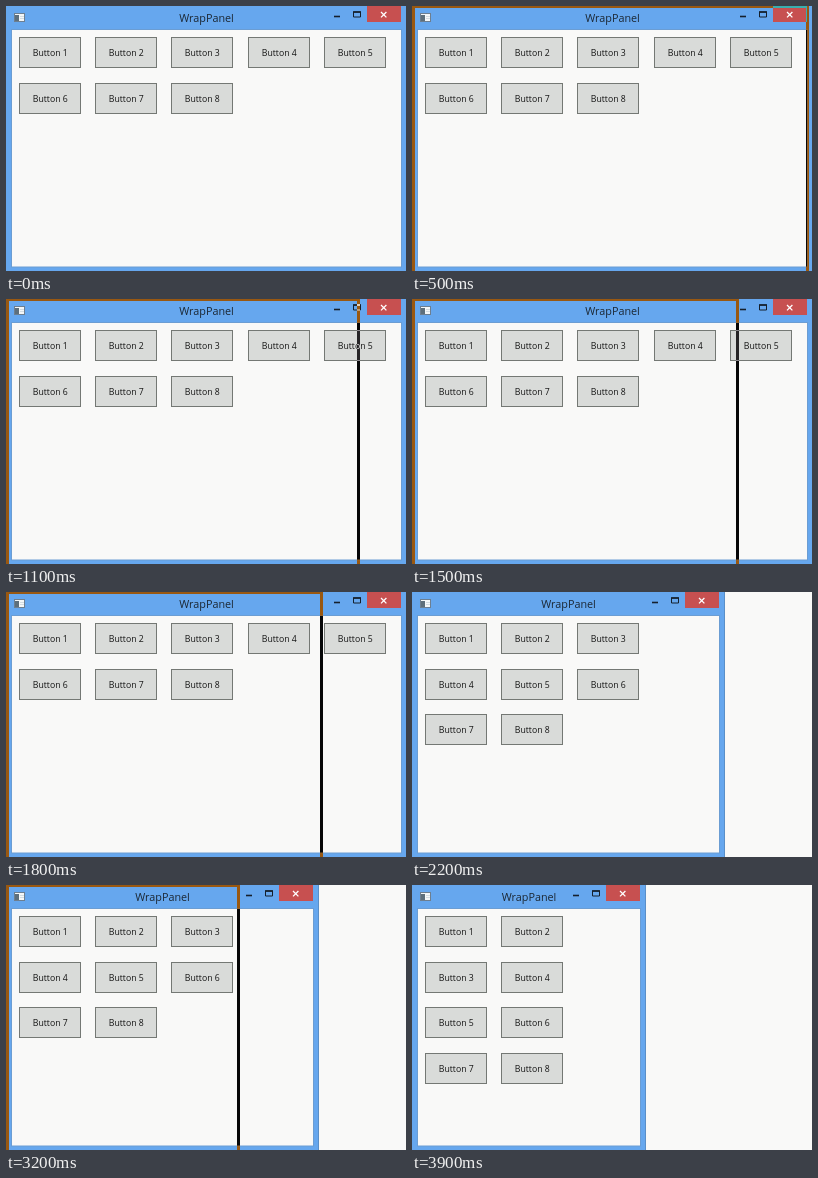
Write an HTML page that moves like this. It is 400 px wide and 265 px high and loops after 4.2 s.

```html
<!DOCTYPE html>
<html lang="en">
<head>
<meta charset="utf-8">
<title>WrapPanel</title>
<style>
  html, body { margin: 0; width: 100%; height: 100%; overflow: hidden; background: #f9f9f8; }
  svg { display: block; width: 100%; height: 100%; font-family: "Open Sans", "Noto Sans", sans-serif; }
  text { text-anchor: middle; fill: #141414; }
  #title { font-size: 10.8px; fill: #1b2733; }
  #buttons text { font-size: 8.7px; }
  #buttons rect { fill: #d9dbd9; stroke: #747874; }
  #drag { fill: none; stroke: #fff; stroke-width: 3; mix-blend-mode: difference; }
</style>
</head>
<body>
<svg viewBox="0 0 400 265">
  <rect width="400" height="265" fill="#f9f9f8"/>
  <rect id="frame" x="-.5" y="-.5" height="270" fill="#66a7ee" stroke="#5a8fc8"/>
  <rect id="client" x="5.5" y="23.5" height="237.5" fill="#f9f9f8" stroke="#6b9dd3"/>
  <g id="icon">
    <rect x="8.5" y="7.5" width="10" height="8" fill="#f4f7f8" stroke="#6d7f91"/>
    <rect x="9" y="9" width="4" height="6" fill="#5d6f7c"/>
    <path d="M14 10.5h4M14 12.5h4" stroke="#d3dce2"/>
  </g>
  <text id="title" y="15.7">WrapPanel</text>
  <g id="controls">
    <rect x="-34" width="34" height="16" fill="#c75050"/>
    <path d="M-20 6l5.4 5.4M-14.6 6l-5.4 5.4" stroke="#fff" stroke-width="1.3"/>
    <path d="M-67 10.5h6" stroke="#15202c" stroke-width="1.6"/>
    <path d="M-47.5 6v5h7v-5z" fill="none" stroke="#15202c"/>
    <path d="M-48 6h8" stroke="#15202c" stroke-width="1.6"/>
  </g>
  <g id="buttons"></g>
  <rect id="drag" x="1.5" y=".5" height="275"/>
</svg>
<script>
const LOOP = 4200, STEP = 100;
const PITCH_X = 76.2, PITCH_Y = 45.7;

// [start ms, window width]
const sizes = [[0, 401], [2200, 313], [3500, 234]];

// Each drag: visible until `end`, outline edge through [ms, x] points
const drags = [
  { end: 2200, path: [[500, 397], [700, 381], [1500, 327], [1900, 313]] },
  { end: 3500, path: [[2600, 307], [2800, 270], [3000, 247], [3200, 234]] }
];

const $ = id => document.getElementById(id);
const set = (el, attrs) => {
  for (const key in attrs) el.setAttribute(key, attrs[key]);
  return el;
};
const add = (parent, tag, attrs) =>
  parent.appendChild(set(document.createElementNS("http://www.w3.org/2000/svg", tag), attrs));

const buttons = Array.from({ length: 8 }, (_, i) => {
  const g = add($("buttons"), "g", {});
  add(g, "rect", { x: 13.5, y: 31.5, width: 61, height: 30 });
  add(g, "text", { x: 44.3, y: 50 }).textContent = `Button ${i + 1}`;
  return g;
});

function along(path, t) {
  const i = path.findIndex(p => p[0] > t);
  if (i < 0) return path[path.length - 1][1];
  const [t0, x0] = path[i - 1], [t1, x1] = path[i];
  return x0 + (x1 - x0) * (t - t0) / (t1 - t0);
}

function layout(width) {
  const clientWidth = width - 12;
  const columns = Math.floor(clientWidth / PITCH_X);
  set($("frame"), { width });
  set($("client"), { width: clientWidth + 1 });
  set($("title"), { x: width / 2 });
  set($("controls"), { transform: `translate(${width - 6})` });
  buttons.forEach((g, i) => {
    const x = Math.round(i % columns * PITCH_X);
    const y = Math.round(Math.floor(i / columns) * PITCH_Y);
    set(g, { transform: `translate(${x} ${y})` });
  });
}

function render(now) {
  const t = Math.floor(now % LOOP / STEP) * STEP;
  layout(sizes.filter(s => s[0] <= t).pop()[1]);

  const drag = drags.find(d => t >= d.path[0][0] && t < d.end);
  $("drag").style.display = drag ? "" : "none";
  if (drag) set($("drag"), { width: Math.round(along(drag.path, t)) - 3 });
}

const start = performance.now();
function tick() {
  render(performance.now() - start);
  requestAnimationFrame(tick);
}
tick();
</script>
</body>
</html>
```
